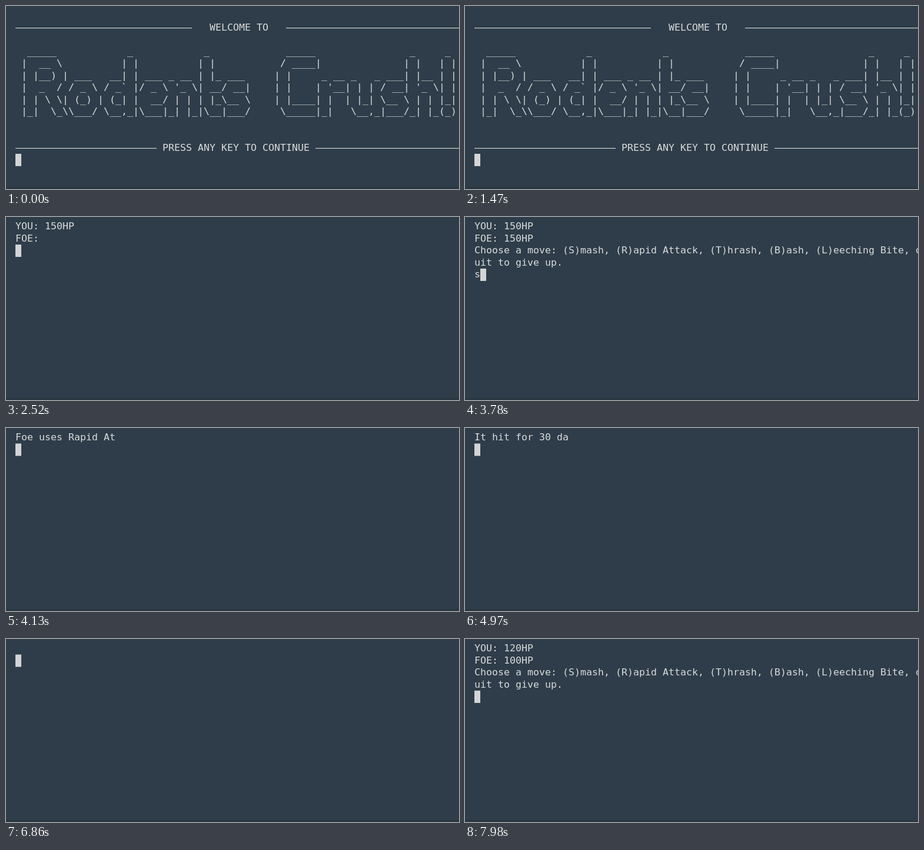
These frames come from a looping animation (770x312 px, 8 s). An HTML page:

```html
<!DOCTYPE html>
<html lang="en">
<head>
<meta charset="utf-8">
<title>Terminal battle</title>
<style>
  html, body { margin: 0; width: 100%; height: 100%; overflow: hidden; background: #25323c; }
  #term {
    position: absolute; inset: 0; overflow: hidden;
    box-sizing: border-box; border-bottom: 3px solid #283640;
    border-radius: 4px; background: #2e3d49; color: #d9dbdc;
  }
  #text {
    position: absolute; left: 16px; top: 6px; margin: 0;
    font: 16.61px/20.5px "DejaVu Sans Mono", monospace;
    font-variant-ligatures: none; white-space: pre;
  }
  #cursor { position: absolute; left: 16px; top: 6px; width: 10px; height: 20.5px; background: #d3d4d5; }
</style>
</head>
<body>
<div id="term"><pre id="text"></pre><div id="cursor"></div></div>
<script>
const LOOP = 8000, TICK = 70, CHAR_MS = 16, ROW = 20.5, COL = 10;
const textEl = document.getElementById("text");
const cursorEl = document.getElementById("cursor");

// Banner letters, six rows each; short letters fill the lower rows.
const GLYPHS = {
  R: [" _____  ", "|  __ \\ ", "| |__) |", "|  _  / ", "| | \\ \\ ", "|_|  \\_\\"],
  C: ["  _____ ", " / ____|", "| |     ", "| |     ", "| |____ ", " \\_____|"],
  d: ["     _ ", "    | |", "  __| |", " / _` |", "| (_| |", " \\__,_|"],
  t: [" _   ", "| |  ", "| |_ ", "| __|", "| |_ ", " \\__|"],
  h: [" _     ", "| |    ", "| |__  ", "| '_ \\ ", "| | | |", "|_| |_|"],
  o: ["  ___  ", " / _ \\ ", "| (_) |", " \\___/ "],
  e: ["  ___ ", " / _ \\", "|  __/", " \\___|"],
  n: [" _ __  ", "| '_ \\ ", "| | | |", "|_| |_|"],
  s: [" ___ ", "/ __|", "\\__ \\", "|___/"],
  r: [" _ __ ", "| '__|", "| |   ", "|_|   "],
  u: [" _   _ ", "| | | |", "| |_| |", " \\__,_|"],
  "!": [" _ ", "| |", "| |", "| |", "|_|", "(_)"]
};

// Neighbouring letters share one column; slashes win over bars.
function drawWord(grid, word, x) {
  for (const letter of word) {
    const rows = GLYPHS[letter];
    rows.forEach((row, r) => {
      const line = grid[r + 6 - rows.length];
      [...row].forEach((ch, i) => {
        const keep = ch === " " || (ch === "|" && "/\\".includes(line[x + i]));
        if (!keep) line[x + i] = ch;
      });
    });
    x += rows[0].length - 1;
  }
}

function banner() {
  const grid = Array.from({ length: 6 }, () => Array(76).fill(" "));
  drawWord(grid, "Rodents", 1);
  drawWord(grid, "Crush!", 44);
  return grid.map(line => line.join(""));
}

const dash = n => "\u2013".repeat(n);
const TITLE = [
  "",
  dash(30) + "   WELCOME TO   " + dash(30),
  "",
  ...banner(),
  "", "",
  dash(24) + " PRESS ANY KEY TO CONTINUE " + dash(25)
];
const PROMPT = [
  "Choose a move: (S)mash, (R)apid Attack, (T)hrash, (B)ash, (L)eeching Bite, or (q",
  "uit to give up."
];

const still = (lines, tail = "") => () => ({ lines, tail });

// Types the lines one after another; the cursor waits on the row below.
const typed = (start, ...lines) => t => {
  let left = Math.max(0, Math.floor((t - start) / CHAR_MS));
  const out = [];
  for (const line of lines) {
    out.push(line.slice(0, left));
    left -= line.length;
    if (left <= 0) break;
  }
  return { lines: out, tail: "" };
};

const stats = (you, foe) => [`YOU: ${you}HP`, `FOE: ${foe}HP`];
const before = stats(150, 150), after = stats(120, 100);

const SCENES = [
  [0, still(TITLE)],
  [1540, typed(1553, "A foe is approaching!")],
  [2310, typed(2285, ...before)],
  [2660, still([...before, ...PROMPT])],
  [3780, still([...before, ...PROMPT], "s")],
  [3850, typed(3848, "Foe uses Rapid Attack!")],
  [4690, typed(4703, "It hit for 30 damage.")],
  [5460, typed(5473, "You smashed!")],
  [6160, typed(6173, "It hit for 50 damage.")],
  [6860, typed(6975, ...after)],
  [7350, still([...after, ...PROMPT])]
];

// Keeps every character cell exactly COL pixels wide.
textEl.textContent = "0".repeat(50);
const cell = textEl.getBoundingClientRect().width / 50;
textEl.style.letterSpacing = (COL - cell) + "px";

let shown = null;
function render(now) {
  const t = Math.floor((now % LOOP) / TICK) * TICK;
  if (t !== shown) {
    shown = t;
    const scene = SCENES.filter(s => s[0] <= t).pop()[1];
    const { lines, tail } = scene(t);
    textEl.textContent = [...lines, tail].join("\n");
    cursorEl.style.transform = `translate(${tail.length * COL}px, ${lines.length * ROW}px)`;
  }
}

const begin = performance.now();
function frame() {
  render(performance.now() - begin);
  requestAnimationFrame(frame);
}
frame();
</script>
</body>
</html>
```
